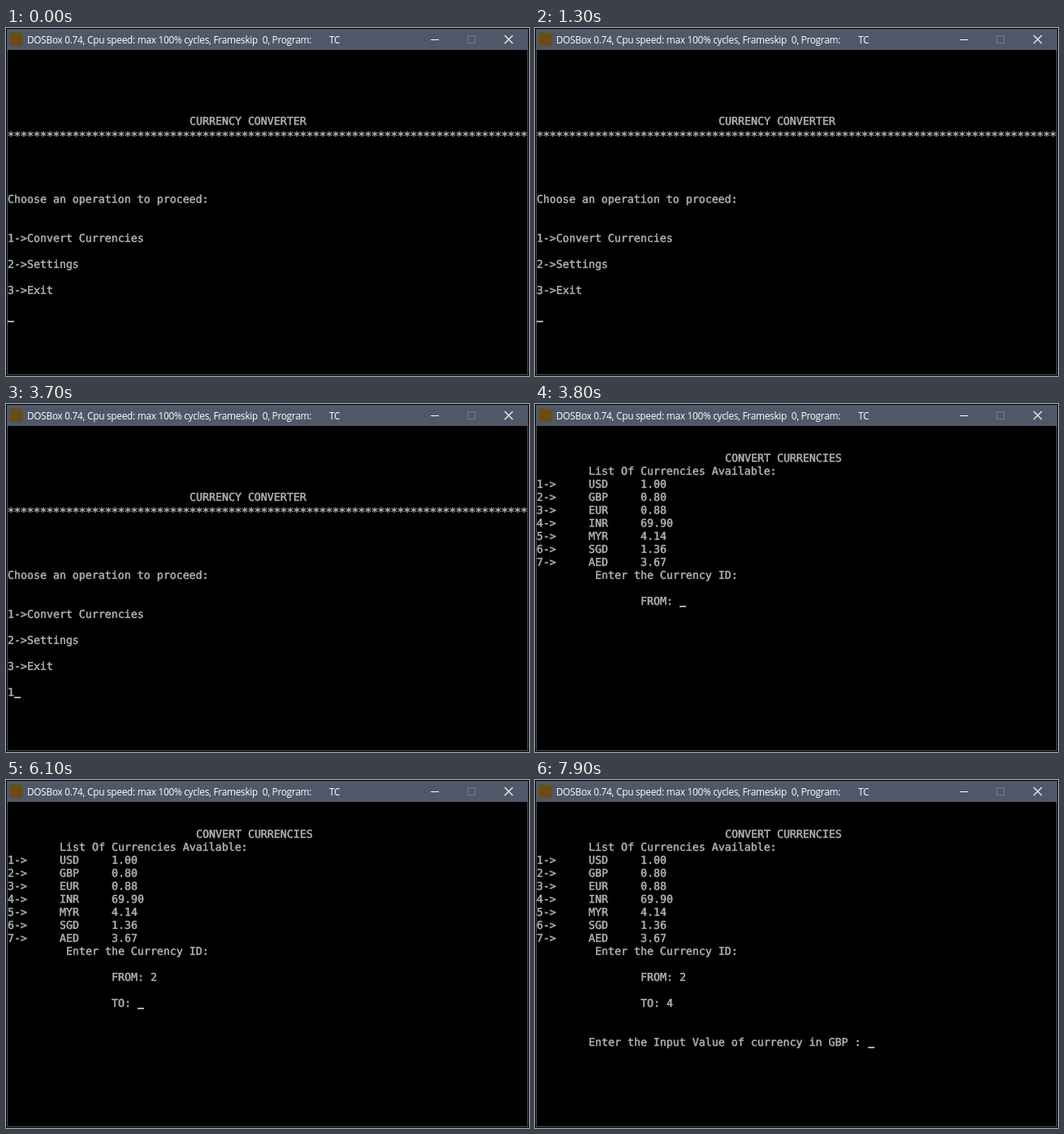
Recreate the animation shown at these times as an HTML page. Size 644 by 428 pixels, loop 8000 ms.

```html
<!DOCTYPE html>
<html lang="en">
<head>
<meta charset="utf-8">
<title>Currency converter</title>
<style>
  html, body { margin: 0; width: 100%; height: 100%; overflow: hidden; background: #000; }
  #window { position: relative; width: 644px; height: 428px; overflow: hidden; background: #000; }
  #frame { position: absolute; inset: 1px; border: 1px solid #4b5565; }
  #bar { position: absolute; left: 1px; top: 1px; width: 642px; height: 26px; background: #4e5868; }
  #bar span {
    position: absolute; top: 4px; color: #fff; white-space: pre;
    font: 11.8px/18px "Open Sans", "Noto Sans", sans-serif; letter-spacing: -.257px;
  }
  #icon { position: absolute; left: 4px; top: 5px; width: 16px; height: 16px; background: #6b4c14; }
  #buttons { position: absolute; left: 0; top: 0; fill: none; }
  #screen { position: absolute; left: 2px; top: 27px; width: 640px; height: 399px; overflow: hidden; }
  #screen span {
    position: absolute; margin-top: 1px; color: #b0b0b0; white-space: pre;
    font: 13.288px/16px "DejaVu Sans Mono", monospace;
    -webkit-text-stroke: .5px #b0b0b0;
    text-rendering: geometricPrecision; font-variant-ligatures: none;
  }
  #screen .stars {
    margin: 2px 0 0 -.5px; font-size: 15px; font-weight: bold;
    letter-spacing: -1.03px; -webkit-text-stroke-width: 0;
  }
  #cursor { position: absolute; width: 8px; height: 2px; background: #aaa; }
  [hidden] { display: none; }
</style>
</head>
<body>
<div id="window">
  <div id="frame"></div>
  <div id="bar">
    <div id="icon"></div>
    <span style="left:25px">DOSBox 0.74, Cpu speed: max 100% cycles, Frameskip  0, Program:</span>
    <span style="left:397px">TC</span>
  </div>
  <svg id="buttons" width="644" height="27">
    <path d="M523 14.5h10" stroke="#fff"/>
    <rect x="568.5" y="9.5" width="9" height="9" stroke="#747b88"/>
    <path d="M614 9l10 10M624 9l-10 10" stroke="#fff" stroke-width="1.1"/>
  </svg>
  <div id="screen"><div id="cursor"></div></div>
</div>
<script>
const LOOP = 8000, STEP = 100;
const CELL_W = 8, CELL_H = 16, CURSOR_LINE = 13;
const BLINK_RATE = 0.459, BLINK_PHASE = 0.045; // cycles per step

const screen = document.getElementById('screen');
const cursor = document.getElementById('cursor');
const lines = [];

// Text at a character cell, visible from one time up to another.
function put(row, col, text, from, to = LOOP, cls = '') {
  const el = document.createElement('span');
  el.textContent = text;
  el.className = cls;
  el.style.left = col * CELL_W + 'px';
  el.style.top = row * CELL_H + 'px';
  screen.append(el);
  lines.push({ el, from, to });
}

const MENU_END = 3800;
const menu = (row, col, text, cls) => put(row, col, text, 0, MENU_END, cls);
menu(5, 28, 'CURRENCY CONVERTER');
menu(6, 0, '*'.repeat(80), 'stars');
menu(11, 0, 'Choose an operation to proceed:');
['Convert Currencies', 'Settings', 'Exit'].forEach((name, i) =>
  menu(14 + 2 * i, 0, `${i + 1}->${name}`));
put(20, 0, '1', 3700, MENU_END);

put(2, 29, 'CONVERT CURRENCIES', MENU_END);
put(3, 8, 'List Of Currencies Available:', MENU_END);
const rates = { USD: 1, GBP: 0.8, EUR: 0.88, INR: 69.9, MYR: 4.14, SGD: 1.36, AED: 3.67 };
Object.entries(rates).forEach(([code, rate], i) => {
  put(4 + i, 0, `${i + 1}->`, MENU_END);
  put(4 + i, 8, code, MENU_END);
  put(4 + i, 16, rate.toFixed(2), MENU_END);
});
put(11, 9, 'Enter the Currency ID:', MENU_END);
put(13, 16, 'FROM:', MENU_END);
put(13, 22, '2', 5800);
put(15, 16, 'TO:', 5900);
put(15, 20, '4', 7200);
put(18, 8, 'Enter the Input Value of currency in GBP :', 7300);

// [start time, row, column]
const cursorStops = [
  [0, 20, 0], [3700, 20, 1], [3800, 13, 22], [5800, 13, 23],
  [5900, 15, 20], [7200, 15, 21], [7300, 18, 51]
];

function draw(now) {
  const step = Math.floor((now % LOOP) / STEP);
  const t = step * STEP;
  for (const { el, from, to } of lines) el.hidden = t < from || t >= to;

  const [, row, col] = cursorStops.filter(([start]) => start <= t).pop();
  cursor.style.left = col * CELL_W + 'px';
  cursor.style.top = row * CELL_H + CURSOR_LINE + 'px';
  cursor.hidden = (step * BLINK_RATE + BLINK_PHASE) % 1 >= 0.5;
}

function tick() {
  draw(performance.now());
  requestAnimationFrame(tick);
}
tick();
</script>
</body>
</html>
```
